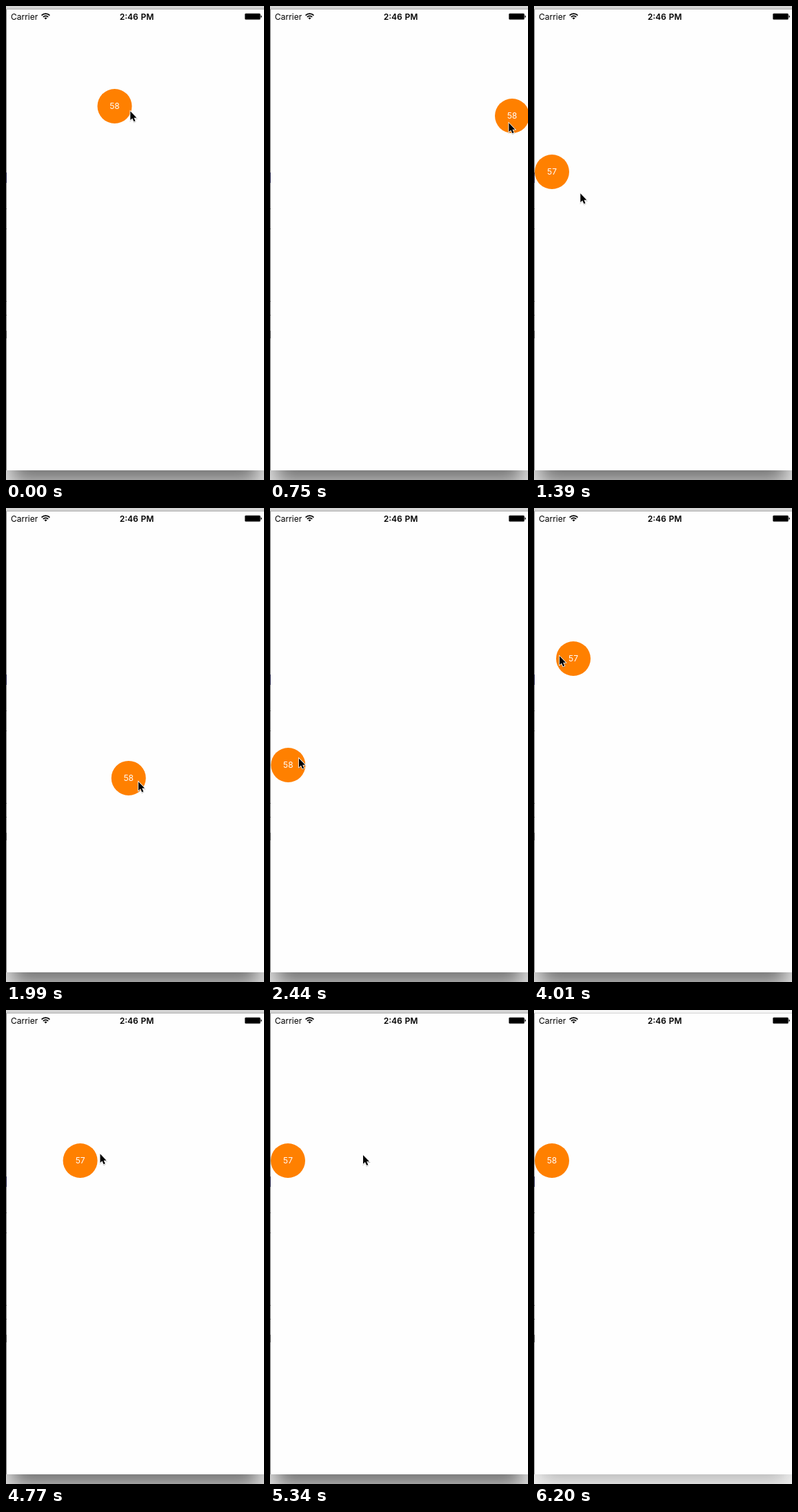
Recreate the animation shown at these times as an HTML page. Size 374 px wide and 686 px high, loop 6.26 s.

```html
<!DOCTYPE html>
<html lang="en">
<head>
<meta charset="utf-8">
<title>Draggable counter</title>
<style>
  html, body { margin: 0; width: 100%; height: 100%; overflow: hidden; background: #fefefe; }
  svg { display: block; width: 374px; height: 686px; }
  text { font-family: Inter, Roboto, sans-serif; font-size: 12px; }
  #desk { --bar: #d4d4d4; --rule: #aeaeae; --base: #e0e0e0; --edge: #7f7f7f; }
  #desk.idle { --bar: #f6f6f6; --rule: #d2d2d2; --base: #f0f0f0; --edge: #9a9a9a; }
  #shadow { opacity: .48; }
  .idle #shadow { opacity: .24; transform: translateY(-8px); }
</style>
</head>
<body>
<svg id="desk" viewBox="0 0 374 686">
  <defs>
    <filter id="blur" x="-20%" y="-20%" width="140%" height="140%">
      <feGaussianBlur stdDeviation="14"/>
    </filter>
    <filter id="soft" x="-50%" y="-50%" width="200%" height="200%">
      <feDropShadow dx="0" dy="1" stdDeviation=".8" flood-opacity=".35"/>
    </filter>
  </defs>

  <!-- window and its shadow -->
  <rect width="374" height="686" fill="var(--base)"/>
  <rect id="shadow" x="10" y="400" width="354" height="289" filter="url(#blur)"/>
  <rect width="374" height="672" fill="#fefefe"/>
  <rect width="374" height="4" fill="var(--bar)"/>
  <rect y="4" width="374" height="1" fill="var(--rule)"/>
  <rect y="5" width="1" height="667" fill="var(--edge)"/>
  <path d="M.5 241v15" stroke="#25254a"/>
  <path d="M.5 293v1M.5 322v1M.5 427v1M.5 447v1M.5 470v11" stroke="#444"/>

  <!-- status bar -->
  <text x="7" y="20">Carrier</text>
  <g fill="none" stroke="#000" stroke-width="1.7">
    <path d="M51.6 13.6a8.2 8.2 0 0 1 11.8 0M53.8 16a5.2 5.2 0 0 1 7.4 0"/>
    <path d="M57.5 19.6l-2-2.1a2.9 2.9 0 0 1 4 0z" fill="#000" stroke="none"/>
  </g>
  <text x="189.5" y="20" text-anchor="middle" font-weight="600" word-spacing=".8">2:46 PM</text>
  <rect x="346.4" y="10.9" width="22.2" height="8.7" rx="1.4" stroke="#555" stroke-width=".6"/>
  <path d="M369.4 13.3q1.4.4 1.4 1.9t-1.4 1.9z"/>

  <g id="ball">
    <circle r="25" fill="#ff8000"/>
    <text id="count" y="4.4" text-anchor="middle" fill="#fff">58</text>
  </g>
  <g id="mouse">
    <path d="M0 0V15L3.4 11.9 6 17.6 8.5 16.5 6 11H10.6Z" transform="translate(.3 .3) scale(.85)"
          stroke="#fff" stroke-width="1.8" paint-order="stroke" filter="url(#soft)"/>
  </g>
</svg>
<script>
  const LOOP = 6260, STEP = 58, IDLE_AT = 6200;
  const SLIDE = 260, DRIFT = 300, TRAVEL = 600;
  const LEFT = 26, RIGHT = 351, MIDDLE = 188;
  const [desk, ball, mouse, count] =
    ['desk', 'ball', 'mouse', 'count'].map(id => document.getElementById(id));

  // Each drag pulls the ball to `to`, curving towards `via`; `grip` is the pointer's place on the
  // ball, and `rest` is where the pointer pauses after letting go.
  const drags = [
    { grab: 0, drop: 464, via: [250, 195], to: [330, 159], grip: [22.5, 7] },
    { grab: 870, drop: 1120, to: [95, 240], grip: [-5, 10], rest: [67, 271] },
    { grab: 1740, drop: 2190, via: [262, 470], to: [150, 372], grip: [14, 5] },
    { grab: 2784, drop: 3248, via: [200, 307], to: [315, 307], grip: [15, -10] },
    { grab: 3538, drop: 3900, via: [220, 218], to: [110, 218], grip: [-2, 11] },
    { grab: 4234, drop: 4702, via: [215, 218], to: [156, 218], grip: [-18, -10], rest: [134, 208] }
  ];
  const EXIT = { time: 5916, at: [343, 700] };

  const clamp = k => Math.min(1, Math.max(0, k));
  const smooth = k => k * k * (3 - 2 * k);
  const easeOut = (k, power) => 1 - (1 - k) ** power;
  const add = (a, b) => a.map((v, i) => v + b[i]);
  const mix = (a, b, k) => a.map((v, i) => v + (b[i] - v) * k);
  const curve = (a, b, c, k) => mix(mix(a, b, k), mix(b, c, k), k);
  const place = (node, [x, y]) => node.setAttribute('transform', `translate(${x} ${y})`);

  // Every drag starts where the previous one came to rest at a side.
  let from = [157.5, 145];
  for (const d of drags) {
    d.from = from;
    d.side = from = [d.to[0] < MIDDLE ? LEFT : RIGHT, d.to[1]];
    d.via ??= mix(d.from, d.to, .5);
  }
  drags.forEach((d, i) => {
    const next = drags[i + 1];
    d.end = next ? next.grab : EXIT.time;
    d.target = next ? add(next.from, next.grip) : EXIT.at;
    d.rest ??= d.target;
  });

  function pose(t) {
    const d = drags.findLast(d => d.grab <= t);
    if (t < d.drop) {
      const at = curve(d.from, d.via, d.to, smooth((t - d.grab) / (d.drop - d.grab)));
      return [at, add(at, d.grip)];
    }
    const since = t - d.drop;
    const slid = mix(d.to, d.side, easeOut(clamp(since / SLIDE), 2));
    const drifted = mix(add(d.to, d.grip), d.rest, easeOut(clamp(since / DRIFT), 3));
    const travel = Math.min(TRAVEL, d.end - d.drop - DRIFT);
    return [slid, mix(drifted, d.target, smooth(clamp(1 - (d.end - t) / travel)))];
  }

  function draw(now) {
    const t = now % LOOP;
    const [ballAt, mouseAt] = pose(Math.floor((t + 8) / STEP) * STEP);
    place(ball, ballAt);
    place(mouse, mouseAt);
    // the reading refreshes once a second
    count.textContent = [1, 4, 5].includes(Math.floor((t + 20) / 1000)) ? 57 : 58;
    desk.classList.toggle('idle', t >= IDLE_AT);
  }

  const start = performance.now();
  function frame() {
    draw(performance.now() - start);
    requestAnimationFrame(frame);
  }
  frame();
</script>
</body>
</html>
```
